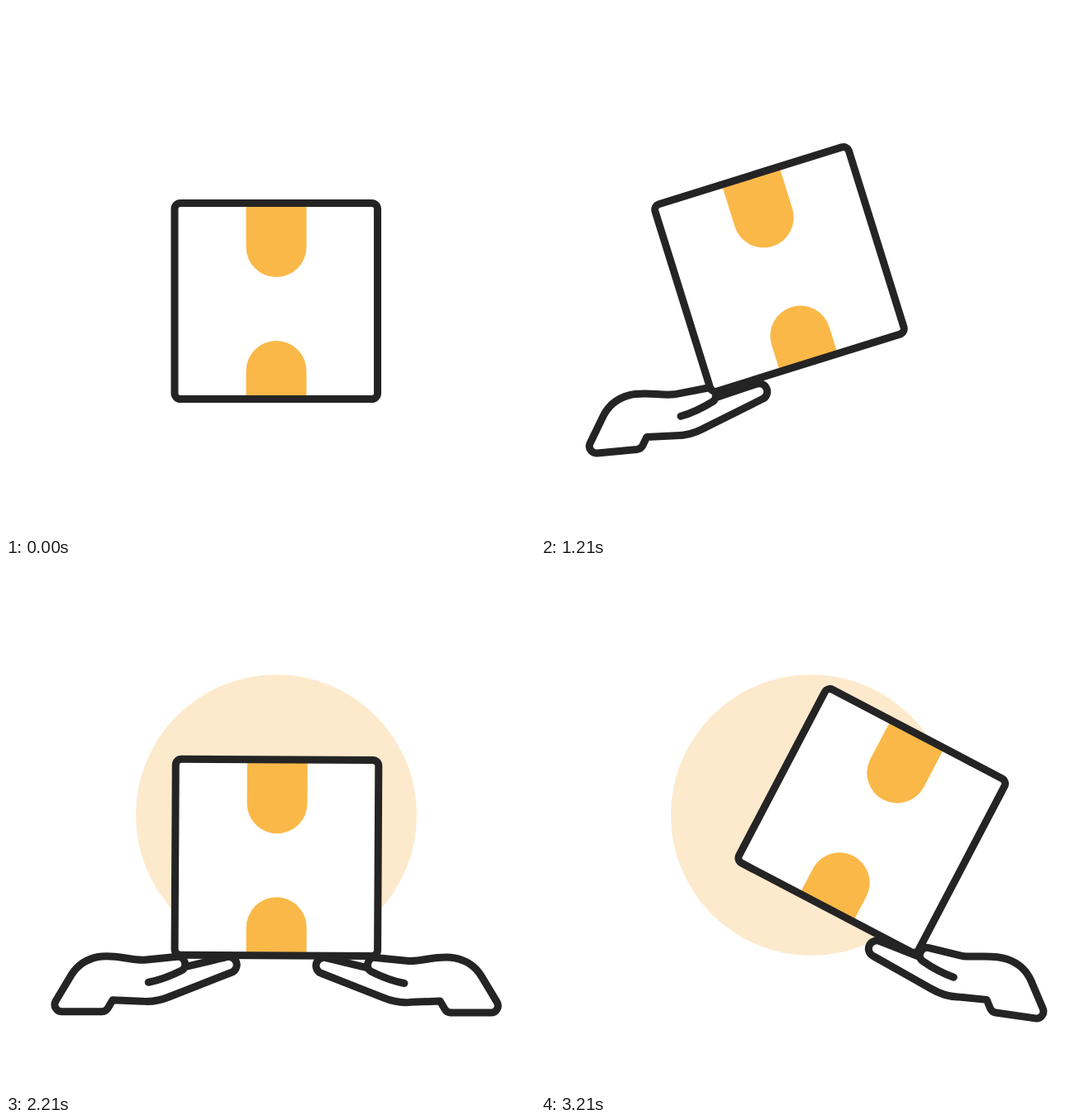
An HTML page for the animation above (3570 ms loop, 640 px wide and 640 px high).

```html
<!DOCTYPE html>
<html lang="en">
<head>
<meta charset="utf-8">
<title>Handing over a box</title>
<style>
  html, body { margin: 0; width: 100%; height: 100%; overflow: hidden; background: #fff; }
  svg { display: block; width: 100%; height: 100%; }
  .line { stroke: #242424; stroke-width: 9; stroke-linecap: round; stroke-linejoin: round; fill: none; }
</style>
</head>
<body>
<svg viewBox="0 0 640 640">
  <defs>
    <path id="hand" class="line" d="M152 563 C168 563 180 560.5 194 556.5 C202.5 554 201.5 539.5 192 539
      L152 535.5 C135 533 118 521.5 98 521.5 C84 521.5 72 526 62 537
      L37.5 564.5 A8.5 8.5 0 0 0 42.5 578.4 L90 587.3 Q95 588 98 584.5 L105.5 576
      L140 584 C152 587.5 161 587.5 173 585 L252.5 570 A9.8 9.8 0 0 0 250 550.5 L199 553"/>
  </defs>
  <circle id="halo" cx="327" cy="305" r="170" fill="#fdeacd"/>
  <use id="left" href="#hand"/>
  <use id="right" href="#hand"/>
  <g id="box">
    <rect x="204" y="238.5" width="245.5" height="237" rx="7" fill="#fff"/>
    <path fill="#fab848" d="M290.5 242.5 H363.5 V291.5 A36.5 36.5 0 0 1 290.5 291.5 Z
      M290.5 471.5 H363.5 V441.5 A36.5 36.5 0 0 0 290.5 441.5 Z"/>
    <rect class="line" x="204" y="238.5" width="245.5" height="237" rx="7"/>
  </g>
</svg>
<script>
const LOOP = 3570, FPS = 14, LAST_FRAME = 45, MIRROR = 653.5;
const [halo, left, right, box] = ['halo', 'left', 'right', 'box'].map(id => document.getElementById(id));

const clamp = x => Math.min(1, Math.max(0, x));
const ramp = (f, from, to) => clamp((f - from) / (to - from));
const ease = (f, from, to) => { const x = ramp(f, from, to); return x * x * (3 - 2 * x); };

// Places a hand by the centre of its cuff corner; angle 0 is the carrying pose.
function placeHand(el, x, y, angle, opacity, prefix = '') {
  el.setAttribute('transform',
    `${prefix} translate(${x} ${y}) rotate(${angle - 10.7}) translate(-44 -570)`);
  el.setAttribute('opacity', opacity);
}

function draw(f) {
  const away = 1 - ease(f, -0.3, 13.2) + ease(f, 31, 45);
  const tiltLeft = ease(f, 13.9, 19.25) - ease(f, 19.25, 25);
  const tiltRight = ease(f, 30, 46);
  const arriving = 1 - ease(f, 17.5, 25);

  halo.setAttribute('visibility', f >= 25 ? 'visible' : 'hidden');

  placeHand(left,
    67.5 - 70 * away - 0.6 * tiltLeft,
    534.2 + 108 * away - 2.8 * tiltLeft,
    31.8 * away - 8.3 * tiltLeft,
    ramp(f, 0, 7.5) - ramp(f, 35, 44));

  placeHand(right,
    67 + 4.5 * arriving - 13 * tiltRight,
    535.5 + 4.5 * arriving + 7 * tiltRight,
    15 * arriving - 8.1 * tiltRight,
    ramp(f, 17.5, 22.9),
    `translate(${MIRROR} 0) scale(-1 1)`);

  box.setAttribute('transform', tiltRight > 0
    ? `rotate(${28 * tiltRight} 455 483.5)`
    : `translate(${8.4 * tiltLeft} ${-9.9 * tiltLeft}) rotate(${-28 * tiltLeft} 198.5 483.5)`);
}

function tick() {
  const t = Math.floor(performance.now() % LOOP / 10) * 10;
  draw(Math.min(LAST_FRAME, Math.floor((t + 5) * FPS / 1000)));
  requestAnimationFrame(tick);
}
tick();
</script>
</body>
</html>
```
